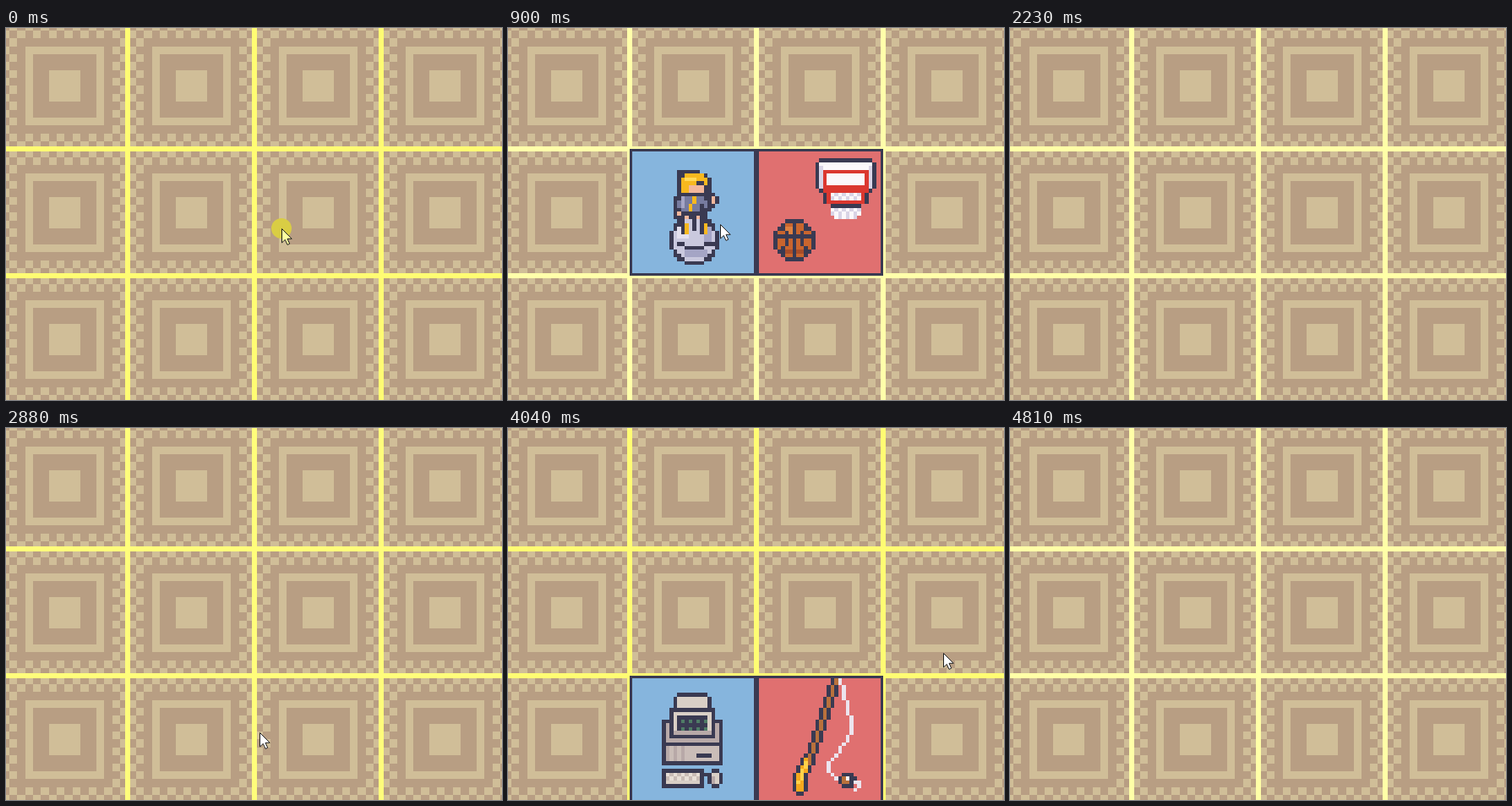
Animation, 587 px wide and 440 px high, one loop 4.84 s. Source, as an HTML page with a canvas:

```html
<!DOCTYPE html>
<html lang="en">
<head>
<meta charset="utf-8">
<title>Memory cards</title>
<style>
html, body { margin: 0; width: 100%; height: 100%; overflow: hidden; background: #b89e83; }
canvas { display: block; }
</style>
</head>
<body>
<canvas id="stage" width="587" height="440"></canvas>
<script>
const LOOP = 4840, CELL = 150, LEFT = -6, TOP = -7;
const INK = '#3a3a52', TAN = '#d0be98', BROWN = '#b89e83';
const BLUE = '#86b5dd', RED = '#e07070', WHITE = '#fbf8fb', LILAC = '#d9d4e6';
const stage = document.getElementById('stage').getContext('2d');

function frame(ctx, color, x, y) {
  ctx.strokeStyle = color;
  ctx.lineWidth = 3;
  ctx.strokeRect(x + 1.5, y + 1.5, CELL - 3, CELL - 3);
}

// Pixel art painter with square units on one card
function painter(unit, offset = 0) {
  const canvas = document.createElement('canvas');
  canvas.width = canvas.height = CELL;
  const ctx = canvas.getContext('2d');
  const snap = v => Math.ceil(offset + v * unit);
  const box = (color, x, y, w, h) => {
    ctx.fillStyle = color;
    ctx.fillRect(snap(x), snap(y), snap(x + w) - snap(x), snap(y + h) - snap(y));
  };
  const round = (color, x, y, w, h) => {
    box(color, x + 1, y, w - 2, h);
    box(color, x, y + 1, w, h - 2);
  };
  const panel = (fill, x, y, w, h) => {
    round(INK, x, y, w, h);
    box(fill, x + 1, y + 1, w - 2, h - 2);
  };
  const disc = (color, x, y, size) => {
    const r = size / 2;
    for (let i = 0; i < size; i++) {
      const inset = Math.round(r - Math.sqrt(r * r - (i + .5 - r) ** 2));
      box(color, x + inset, y + i, size - 2 * inset, 1);
    }
  };
  const checks = (a, b, x, y, w, h) => {
    for (let j = 0; j < h; j++)
      for (let i = 0; i < w; i++) box((i + j) % 2 ? b : a, x + i, y + j, 1, 1);
  };
  // Stepped stroke through [x, y] points, one run per row
  const strand = (color, points, width) => {
    for (let k = 1; k < points.length; k++) {
      const [x0, y0] = points[k - 1], [x1, y1] = points[k];
      for (let y = y0; y < y1; y++)
        box(color, Math.round(x0 + (x1 - x0) * (y - y0) / (y1 - y0)), y, width, 1);
    }
  };
  return { canvas, ctx, box, round, panel, disc, checks, strand };
}

function face(color, draw) {
  const p = painter(4.5, 2);
  p.ctx.fillStyle = color;
  p.ctx.fillRect(0, 0, CELL, CELL);
  draw(p);
  frame(p.ctx, INK, 0, 0);
  return p.canvas;
}

function cardBack() {
  const p = painter(CELL / 16);
  p.checks(BROWN, TAN, 0, 0, 16, 16);
  p.box(BROWN, 2, 2, 12, 12);
  p.box(TAN, 3, 3, 10, 10);
  p.box(BROWN, 4, 4, 8, 8);
  p.box(TAN, 6, 6, 4, 4);
  return p.canvas;
}

const acrobat = lean => face(BLUE, ({ box, round, disc }) => {
  const gold = '#f7b81f', skin = '#f2b79c', coat = '#777b9f', shade = '#a5a5c5';
  const r = 10 - lean, h = 12 + lean, top = 5 - lean;
  // boulder
  disc(INK, r, 17, 13);
  disc('#cac9de', r + 1, 18, 11);
  box('#e4e1ee', r + 2, 20, 3, 3);
  box(shade, r + 9, 20, 2, 4);
  box(shade, r + 4, 26, 6, 2);
  box(INK, r + 2, 24, 2, 1);
  box(INK, r + 4, 25, 5, 1);
  box(INK, r + 9, 24, 3, 1);
  // legs
  box(INK, 12, 16, 8, 2);
  box(skin, 14, 17, 1, 1);
  box(skin, 17, 17, 1, 1);
  for (const x of [13, 18]) {
    box(INK, x + lean, 18, 1, 4);
    box(gold, x + 1 + lean, 19, 1, 3);
  }
  box(INK, 16, 18, 1, 3);
  // coat and hands
  round(INK, 11, 11, 10, 6);
  round(INK, 19, 11, 4, 4);
  box(coat, 13, 12, 6, 4);
  box(shade, 13, 12, 1, 3);
  box(coat, 12, 13, 1, 2);
  box(coat, 19, 13, 1, 2);
  box(skin, 21, 12, 1, 2);
  box(INK, 11, 15, 2, 3);
  box(skin, 12, 16, 1, 1);
  box(gold, 16, 12, 1, 2);
  box(gold, 15, 14, 1, 2);
  box(INK, 18, 14, 1, 2);
  // head
  box(INK, h, top, 6, 2);
  round(INK, h, top + 1, 9, 6);
  box(gold, h + 2, top + 1, 5, 1);
  box(gold, h + 1, top + 2, 7, 2);
  box(gold, h + 1, top + 4, 2, 2);
  box('#ffd95a', h + 2, top + 2, 3, 1);
  box(skin, h + 3, top + 4, 4, 2);
  box(INK, h + 5, top + 3, 2, 1);
});

const hoop = face(RED, ({ box, round, disc, checks }) => {
  const red = '#db3830';
  round(INK, 15, 2, 16, 9);
  box(INK, 17, 10, 12, 4);
  box(WHITE, 16, 3, 14, 7);
  box(LILAC, 16, 4, 1, 6);
  box(LILAC, 29, 4, 1, 6);
  box(red, 17, 5, 12, 6);
  box(WHITE, 18, 6, 10, 3);
  box(red, 18, 11, 10, 3);
  checks(WHITE, LILAC, 19, 11, 8, 2);
  box(INK, 19, 14, 8, 1);
  checks(WHITE, LILAC, 19, 15, 8, 2);
  checks(WHITE, LILAC, 20, 17, 6, 1);
  // ball
  disc(INK, 4, 18, 11);
  disc('#c9652e', 5, 19, 9);
  box('#de8140', 7, 20, 2, 2);
  box('#a94d29', 7, 26, 5, 1);
  box(INK, 9, 19, 1, 9);
  box(INK, 5, 22, 9, 1);
  for (const x of [7, 11]) box(INK, x, 21, 1, 4);
  for (const x of [6, 12]) {
    box(INK, x, 20, 1, 1);
    box(INK, x, 25, 1, 2);
  }
});

const rod = face(RED, ({ box, strand }) => {
  const wood = '#b9713c', gold = '#f5a81e', thread = '#ece4ee';
  const pole = [[19, 0], [17, 6], [15, 12], [13, 18], [12, 21]];
  const shift = dx => pole.map(([x, y]) => [x + dx, y]);
  strand(INK, pole, 3);
  strand(wood, shift(1), 1);
  strand(INK, [[11, 21], [9, 26], [9, 30]], 4);
  box(INK, 10, 30, 2, 1);
  strand(gold, [[12, 21], [10, 26], [10, 30]], 2);
  strand(wood, [[13, 20], [12, 24]], 1);
  strand('#ffd24a', [[12, 22], [10, 28]], 1);
  strand(thread, [[21, 0], [22, 4], [24, 12], [23, 16], [18, 22], [18, 25]], 1);
  box(thread, 19, 25, 1, 1);
  box(thread, 20, 26, 2, 1);
  box(INK, 22, 25, 3, 4);
  box(INK, 21, 26, 5, 2);
  box(wood, 22, 26, 2, 2);
  box(WHITE, 23, 26, 1, 1);
  box(thread, 25, 27, 2, 1);
  box(thread, 26, 28, 1, 1);
  box(thread, 25, 29, 1, 1);
});

const computer = face(BLUE, ({ box, panel, checks }) => {
  const shell = '#d9cfc6', dim = '#b8a9a8';
  box(INK, 8, 11, 16, 12);
  box(dim, 9, 12, 14, 5);
  box('#cabdb8', 9, 18, 14, 4);
  for (let x = 9; x < 14; x += 2) box(dim, x, 18, 1, 4);
  box(INK, 17, 20, 4, 1);
  panel(shell, 11, 4, 10, 5);
  box(INK, 10, 8, 12, 8);
  box(shell, 11, 9, 10, 6);
  box(dim, 11, 14, 10, 1);
  box(INK, 12, 10, 8, 4);
  for (let y = 10; y < 13; y += 2)
    for (let x = 13; x < 20; x += 2) box('#4f7c66', x, y + 1, 1, 1);
  box(INK, 8, 24, 11, 5);
  checks('#e7ded6', '#c8bbb5', 9, 25, 9, 2);
  box(shell, 9, 27, 9, 1);
  panel(shell, 20, 24, 4, 5);
  box(INK, 19, 25, 1, 1);
  box(dim, 21, 26, 1, 2);
});

const back = cardBack();
const poses = [acrobat(1), acrobat(0)];
const cards = [
  { col: 2, row: 1, open: 110, close: 1930, art: () => hoop },
  { col: 1, row: 1, open: 640, close: 1930, art: t => poses[Math.floor(t / 300) % 2] },
  { col: 2, row: 2, open: 3010, close: 4600, art: () => rod },
  { col: 1, row: 2, open: 3620, close: 4600, art: () => computer }
];

// time, x, y
const moves = [
  [0, 326, 237], [130, 326, 237], [460, 251, 232], [960, 251, 232], [1400, 515, 196],
  [2480, 515, 196], [2680, 365, 238], [2880, 300, 360], [3080, 300, 360],
  [3360, 205, 359], [3680, 205, 359], [4000, 515, 266], [LOOP, 515, 266]
];
const clicks = [0, 540, 2920, 3520];
const hidden = [[1420, 2480], [4400, LOOP]];

// time, paleness of the grid lines
const glow = [[0, .35], [900, 1], [1480, .35], [2230, .97], [3460, 0], [4040, .35], [4810, .97], [LOOP, 1]];

const ease = k => k * k * (3 - 2 * k);
const within = (t, a, b) => t >= a && t < b;

function sample(track, t) {
  const i = track.findIndex(p => p[0] > t);
  const a = track[i - 1], b = track[i];
  const k = ease((t - a[0]) / (b[0] - a[0]));
  return a.slice(1).map((v, n) => v + (b[n + 1] - v) * k);
}

const arrow = new Path2D('M.5.5V17L4.3 13.4L7 19.4L9.7 18.2L7 12.3H12.2Z');

function drawCursor(t) {
  if (hidden.some(([a, b]) => within(t, a, b))) return;
  const [x, y] = sample(moves, t).map(Math.round);
  const pressed = clicks.some(c => within(t, c, c + 90));
  if (pressed) {
    stage.fillStyle = '#d9cd44';
    stage.beginPath();
    stage.arc(x, y, 12, 0, Math.PI * 2);
    stage.fill();
  }
  stage.save();
  stage.translate(x, y);
  stage.lineWidth = 1;
  stage.fillStyle = pressed ? '#ffffa0' : '#fff';
  stage.strokeStyle = '#222';
  stage.fill(arrow);
  stage.stroke(arrow);
  stage.restore();
}

function render(t) {
  const [pale] = sample(glow, t);
  const line = `rgb(255,${Math.round(251 + 4 * pale)},${Math.round(86 + 84 * pale)})`;
  for (let row = 0; row < 3; row++) {
    for (let col = 0; col < 4; col++) {
      const x = LEFT + col * CELL, y = TOP + row * CELL;
      const card = cards.find(c => c.col === col && c.row === row && within(t, c.open, c.close));
      stage.drawImage(card ? card.art(t) : back, x, y);
      if (!card) frame(stage, line, x, y);
    }
  }
  drawCursor(t);
}

const start = performance.now();
function tick() {
  render((performance.now() - start) % LOOP);
  requestAnimationFrame(tick);
}
tick();
</script>
</body>
</html>
```
